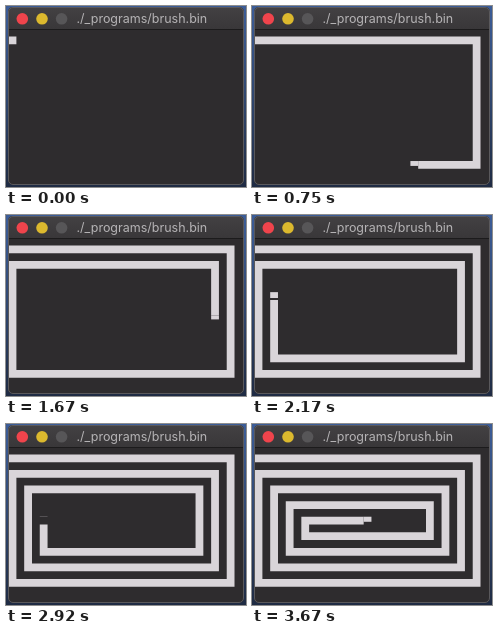
Recreate the animation shown at these times as an HTML page. Size 240 by 181 pixels, loop 3.76 s.

```html
<!DOCTYPE html>
<html lang="en">
<head>
<meta charset="utf-8">
<title>brush.bin</title>
<style>
html, body { margin: 0; width: 100%; height: 100%; overflow: hidden; background: #2a3c60; }
svg { display: block; width: 100vw; height: 100vh; }
text { font: 12.5px Inter, "Liberation Sans", sans-serif; fill: #b5b3b5; }
</style>
</head>
<body>
<svg viewBox="0 0 240 181" preserveAspectRatio="none">
  <defs>
    <linearGradient id="desk" x2="0" y2="1">
      <stop offset="0" stop-color="#3c5d98"/>
      <stop offset=".5" stop-color="#30476f"/>
      <stop offset="1" stop-color="#1f2b43"/>
    </linearGradient>
    <linearGradient id="bar" x2="0" y2="1">
      <stop offset="0" stop-color="#434143"/>
      <stop offset="1" stop-color="#393739"/>
    </linearGradient>
    <clipPath id="win"><rect x="2" y="1" width="236" height="178" rx="5"/></clipPath>
  </defs>
  <rect width="240" height="181" fill="url(#desk)"/>
  <g clip-path="url(#win)">
    <rect x="2" y="1" width="236" height="178" fill="#2e2c2e"/>
    <rect x="2" y="1" width="236" height="22" fill="url(#bar)"/>
    <rect x="2" y="23" width="236" height="1" fill="#1c1b1c"/>
    <path id="trail" fill="none" stroke="#d9d5d9" stroke-linecap="square" stroke-linejoin="miter"/>
    <rect id="tip" fill="#d9d5d9"/>
  </g>
  <rect x="2.5" y="1.5" width="235" height="177" rx="4.5" fill="none" stroke="#5a595c"/>
  <circle cx="16.3" cy="12.8" r="5.8" fill="#f0444c"/>
  <circle cx="36" cy="12.8" r="5.8" fill="#dcb92e"/>
  <circle cx="55.6" cy="12.8" r="5.8" fill="#575658"/>
  <text x="70.5" y="17.3">./_programs/brush.bin</text>
</svg>
<script>
const LOOP = 3760, STEP = 250 / 3, LAST = 44;
const CELL = 7.79, LEFT = 2.6, TOP = 30.4;
const trail = document.getElementById("trail");
const tip = document.getElementById("tip");
trail.setAttribute("stroke-width", CELL);

// Inward spiral over a 29 x 17 grid, one empty lane between turns
const cells = [[0, 0]];
const dirs = [[1, 0], [0, 1], [-1, 0], [0, -1]];
for (let leg = 0; leg < 17; leg++) {
  const length = leg === 0 ? 28 : leg % 2 ? 17 - leg : 30 - leg;
  const [dx, dy] = dirs[leg % 4];
  for (let i = 0; i < length; i++) {
    const [x, y] = cells[cells.length - 1];
    cells.push([x + dx, y + dy]);
  }
}

// [step, cells painted]: the brush speed drifts slightly
const pace = [[0, 1], [5, 29], [13, 76.25], [20, 119.5], [31, 187.8], [38, 230.2], [42, 253], [44, 262.65]];

function painted(step) {
  const i = Math.max(1, pace.findIndex(p => p[0] >= step));
  const [a, from] = pace[i - 1], [b, to] = pace[i];
  return from + (to - from) * (step - a) / (b - a);
}

const startOf = step => Math.round(step * STEP / 10) * 10;

function stepAt(t) {
  let step = Math.min(LAST, Math.floor(t / STEP) + 1);
  while (startOf(step) > t) step--;
  return step;
}

function draw(t) {
  const count = painted(stepAt(t));
  const full = Math.floor(count + 1e-6);
  const points = cells.slice(0, full).map(([x, y]) =>
    (LEFT + (x + .5) * CELL).toFixed(2) + " " + (TOP + (y + .5) * CELL).toFixed(2));
  trail.setAttribute("d", "M" + points[0] + "L" + points.join("L"));

  // The newest cell fills from its top row downwards
  const [x, y] = cells[full];
  tip.setAttribute("x", LEFT + x * CELL);
  tip.setAttribute("y", TOP + y * CELL);
  tip.setAttribute("width", CELL);
  tip.setAttribute("height", Math.max(0, count - full) * CELL);
}

function tick() {
  draw(performance.now() % LOOP);
  requestAnimationFrame(tick);
}
tick();
</script>
</body>
</html>
```
